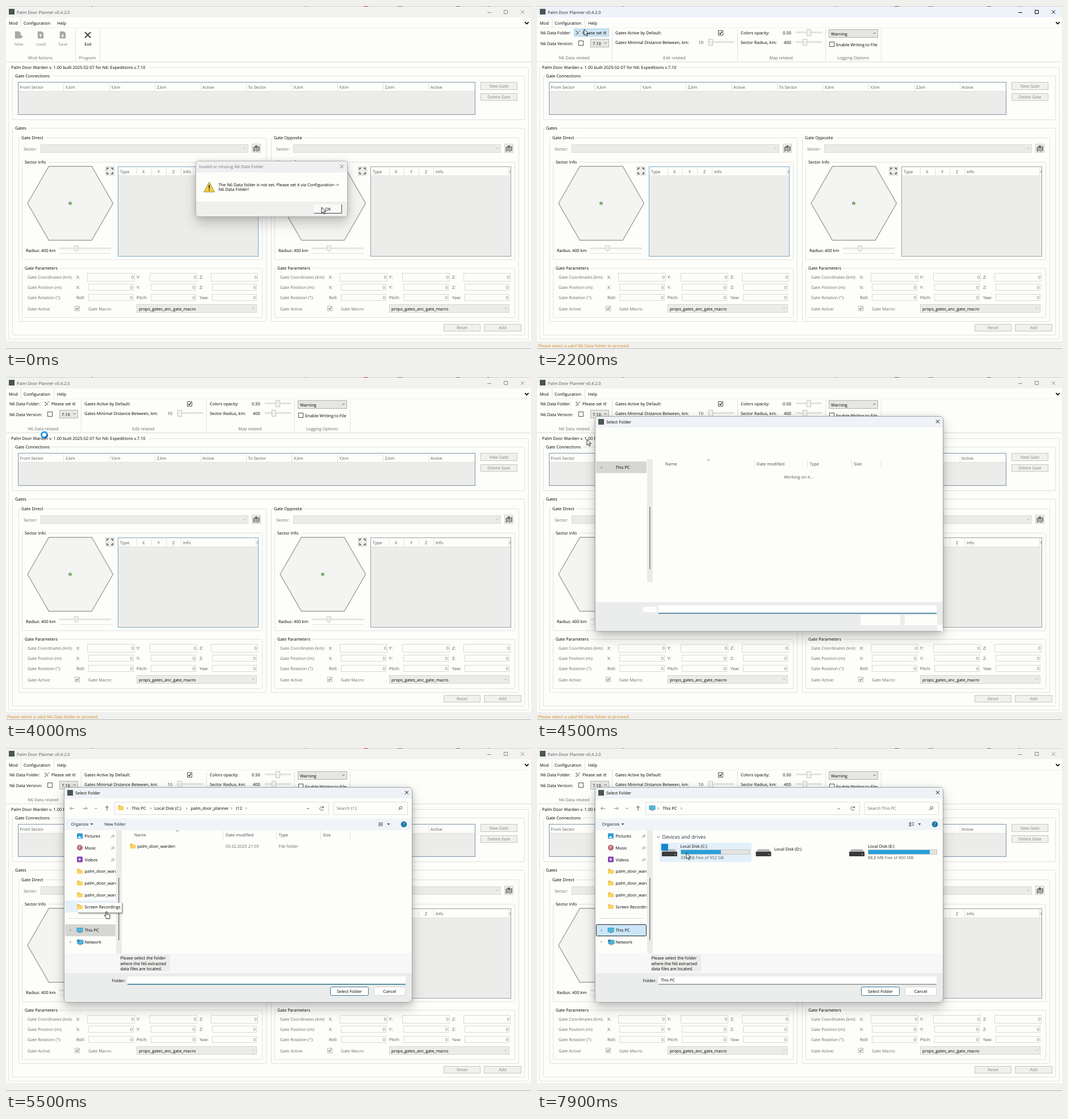
Recreate the animation shown at these times as an HTML page. Size 925 by 605 pixels, loop 8000 ms.

```html
<!DOCTYPE html>
<html lang="en">
<head>
<meta charset="utf-8">
<title>Gate planner</title>
<style>
html, body { margin: 0; width: 100%; height: 100%; overflow: hidden; background: #fdfdfa; }
svg { display: block; width: 925px; height: 605px; }
text { font-family: "Open Sans", "Noto Sans", sans-serif; font-size: 7.4px; text-rendering: geometricPrecision; white-space: pre; }
</style>
</head>
<body>
<svg id="stage" viewBox="0 0 925 605" xmlns="http://www.w3.org/2000/svg"></svg>
<script>
const INK = '#000', GREY = '#6c6c6c', PALE = '#fdfdfa', LINE = '#e0e0de', BLUE = '#26a0da';
const APP = 'Palm Door Planner', TOOL = 'Palm Door Warden', GAME = 'N6';

const text = (x, cy, s, fill = INK, anchor = 'start', more = '') =>
  `<text x="${x}" y="${cy + 2.6}" fill="${fill}" text-anchor="${anchor}" ${more}>${s}</text>`;
const mid = (x, cy, s, fill) => text(x, cy, s, fill, 'middle');
const fillBox = (x, y, x2, y2, fill, more = '') =>
  `<rect x="${x}" y="${y}" width="${x2 - x}" height="${y2 - y}" fill="${fill}" ${more}/>`;
const box = (x, y, x2, y2, fill, stroke, r = 0) =>
  `<rect x="${x + .5}" y="${y + .5}" width="${x2 - x - 1}" height="${y2 - y - 1}" rx="${r}" fill="${fill}" stroke="${stroke}"/>`;
const path = (d, stroke = INK, w = 1, fill = 'none') =>
  `<path d="${d}" fill="${fill}" stroke="${stroke}" stroke-width="${w}"/>`;
const dot = (x, y, r, fill) => `<circle cx="${x}" cy="${y}" r="${r}" fill="${fill}"/>`;
const vline = (x, y, y2, c = LINE) => path(`M${x + .5} ${y}V${y2}`, c);
const hline = (y, x, x2, c = LINE) => path(`M${x} ${y + .5}H${x2}`, c);
const down = (x, y, c = '#555', r = 2, w = .9) => path(`M${x - r} ${y - r / 2}l${r} ${r}l${r} ${-r}`, c, w);
const right = (x, y, c = '#555', r = 1.7) => path(`M${x - r / 2} ${y - r}l${r} ${r}l${-r} ${r}`, c, .9);
const cross = (x, y, r, c, w = 1) => path(`M${x - r} ${y - r}l${2 * r} ${2 * r}M${x + r} ${y - r}l${-2 * r} ${2 * r}`, c, w);
const layer = (id, s) => `<g id="${id}">${s}</g>`;
const shift = (dx, s) => `<g transform="translate(${dx} 0)">${s}</g>`;

// Controls
function group(x, y, x2, y2, label, chars) {
  return box(x, y, x2, y2, 'none', LINE, 1) +
    fillBox(x + 3, y - 2, x + 7 + chars, y + 3, PALE) + text(x + 5, y + .5, label);
}
const button = (x, y, x2, y2, s) => box(x, y, x2, y2, '#f0f0ee', '#c6c6c4') + mid((x + x2) / 2, (y + y2) / 2, s, '#888');
const combo = (x, y, x2, y2, c, stroke, arrow) => box(x, y, x2, y2, c, stroke) + down(x2 - 6.5, (y + y2) / 2 - .5, arrow);
function check(x, y, on, edge = '#555', mark = INK) {
  return box(x, y, x + 9, y + 9, '#fff', edge) + (on ? path(`M${x + 2.2} ${y + 4.5}l1.8 1.8l3 -4`, mark, 1.1) : '');
}
function slider(x, x2, y, thumb, c = '#c4c4c2') {
  return box(x, y - 2, x2, y + 1, '#ececea', '#dcdcda') + box(thumb, y - 6, thumb + 8, y + 6, '#f2f2f0', c);
}
function winButtons(c) {
  return path('M848 11.5h7', c) + path('M877.5 7.5h6v6h-6z', c) + cross(910, 10.5, 3, c);
}
const folder = (x, y) => fillBox(x - 5, y - 4, x, y, '#e0a62c', 'rx="1"') + fillBox(x - 5, y - 2.8, x + 5, y + 4.2, '#f8d262', 'rx="1"');
const monitor = (x, y) => fillBox(x - 5.5, y - 4.5, x + 5.5, y + 3, '#2f86ab', 'rx=".8"') +
  fillBox(x - 4.8, y - 3.8, x + 4.8, y + 2.3, '#4fb9dd') + fillBox(x - 2.5, y + 3.5, x + 2.5, y + 4.5, '#6b7b84');

// Application window
function sideOfGate(name, chars, focus) {
  let s = group(22, 232, 459, 557, name, chars) + text(31, 252, 'Sector:', GREY) +
    combo(61, 244, 427, 259, '#ebebe9', '#dadad8', '#aaa') +
    box(433, 243, 449, 259, '#eee', '#cfcfcd') +
    path('M436 249l3.5 -1.5l3.5 1.5l3.5 -1.5v7.5l-3.5 1.5l-3.5 -1.5l-3.5 1.5z', '#777', 1, '#999') +
    path('M439.5 248v7M443 249v7', '#ddd', .8) + dot(441, 248, 2.3, '#666') +
    group(28, 275, 452, 448, 'Sector Info', 40) +
    path('M38 348L75.5 282.7H151L188.5 348L151 413.3H75.5Z', '#a3a3a1', 1.5, '#f4f4f2') +
    dot(113, 348, 3.2, '#a5cd98') + path('M111.2 349.8v-2q1.8 -2.2 3.6 0v2', '#3d5c3b', .8) +
    box(175, 283, 191, 299, '#eeeeec', '#d2d2d0') +
    path('M178 289v-3h3M185 286h3v3M188 293v3h-3M181 296h-3v-3', '#555', 1.5) +
    box(197, 283, 445, 442, '#ececea', focus) + fillBox(198, 284, 444, 299, PALE) + hline(299, 198, 444);
  for (const x of [230, 256, 282, 308, 440]) s += vline(x, 285, 298);
  for (const [x, h] of [[201, 'Type'], [240, 'X'], [267, 'Y'], [293, 'Z'], [312, 'Info'], [442, 'I']]) s += text(x, 292, h, '#555');
  s += text(35, 431, 'Radius: 400 km') + box(94, 426, 185, 429, '#ececea', LINE) + hline(436, 94, 185) +
    path('M120.5 422.5h7v8l-3.5 3l-3.5 -3z', '#d0d0ce', 1, '#ededeb');
  s += group(28, 462, 452, 550, 'Gate Parameters', 59);
  const rows = [[478, 'Gate Coordinates (km):', 'X:', 'Y:', 'Z:'], [496, 'Gate Position (m):', 'X:', 'Y:', 'Z:'],
    [514, 'Gate Rotation (°):', 'Roll:', 'Pitch:', 'Yaw:']];
  rows.forEach(([y, name, ...axes], r) => {
    s += text(38, y + .5, name, GREY);
    axes.forEach((a, i) => {
      const x = [143, 253, 361][i] + (r ? 2 : 0), x2 = [227, 337, 444][i] - (r ? 2 : 0), h = r ? 6 : 7;
      s += text([124, 230, 341][i], y + .5, a, '#555') + box(x, y - h, x2, y + h + (r ? 0 : 1), PALE, '#d8d8d6') +
        text(x2 - 2, y, '0', GREY, 'end');
    });
  });
  return s + text(38, 534, 'Gate Active:', GREY) + check(121, 529, 1, '#b4b4b2', '#666') + text(145, 534, 'Gate Macro:', GREY) +
    combo(230, 526, 442, 541, '#ebebe9', '#d4d4d2', '#aaa') + text(234, 534, 'props_gates_anc_gate_macro');
}

function mainWindow() {
  let s = fillBox(0, 0, 925, 605, PALE) + fillBox(0, 0, 925, 20, '#f2f2f1') +
    layer('active', fillBox(0, 0, 925, 20, '#eef2f9') + winButtons(INK) + text(19, 11, APP + ' v0.4.2.0', '#222')) +
    layer('inactive', winButtons('#888') + text(19, 11, APP + ' v0.4.2.0', '#555')) +
    fillBox(0, 0, 925, 1, '#cfcfcd') + fillBox(5, 5, 15, 15, '#4a5650');
  for (const [x, w, c] of [[150, 2, '#555'], [526, 3, '#999'], [630, 8, '#b23b4a'], [690, 8, '#777'], [793, 7, '#666'], [848, 4, '#888']])
    s += fillBox(x, 0, x + w, 1, c);
  s += hline(38, 0, 925, '#efefed') + text(5, 30, 'Mod') + text(31, 30, 'Configuration') + text(90, 30, 'Help') +
    down(917.5, 30, INK, 3.2, 1.7) + hline(98, 0, 925, '#dcdcda');
  s += layer('modTab', modTab()) + layer('cfgTab', cfgTab());
  s += group(4, 108, 921, 588, `${TOOL} v. 1.00 built 2025-02-07 for ${GAME}: Expeditions v.7.10`, 241) +
    group(11, 123, 914, 201, 'Gate Connections', 63) +
    box(21, 134, 827, 192, '#ececea', '#8096a6') + fillBox(22, 135, 826, 151, PALE) + hline(150, 22, 826);
  const heads = ['From Sector', 'X,km', 'Y,km', 'Z,km', 'Active', 'To Sector', 'X,km', 'Y,km', 'Z,km', 'Active'];
  heads.forEach((h, i) => s += text(24.5 + i * 80.4, 143.5, h, '#5c5c5c') + (i ? vline(Math.round(21 + i * 80.4), 136, 150) : ''));
  s += button(836, 134, 901, 148, 'New Gate') + button(836, 154, 901, 167, 'Delete Gate') +
    group(11, 215, 914, 581, 'Gates', 22) +
    sideOfGate('Gate Direct', 41, '#79a8c4') + shift(445, sideOfGate('Gate Opposite', 52, '#9a9fa4')) +
    button(771, 561, 836, 574, 'Reset') + button(842, 561, 908, 574, 'Add') +
    fillBox(0, 591, 925, 605, '#f0f0ee') + hline(604, 0, 925, '#b5b5b3') +
    layer('status', text(2, 599.5, `Please select a valid ${GAME} Data folder to proceed.`, '#d88a1c'));
  return s;
}

function modTab() {
  const sheet = (x, mark) => path(`M${x - 5} 45h7l3 3v9h-10z`, '#a8a8a6', .5, '#a8a8a6') + path(mark, '#f6f6f4', 1.3);
  return path('M26.5 20V38', LINE) +
    sheet(21, 'M23 53h5M25.5 50.5v5') + dot(26, 54, 2.8, '#a8a8a6') +
    sheet(61, 'M61 55v-5M59 52l2 -2l2 2') + sheet(100, 'M100 49v5M98 52l2 2l2 -2') +
    cross(144, 51, 5, '#4a4a4a', 2.2) +
    ['New', 'Load', 'Save'].map((s, i) => mid(22.5 + i * 39, 67, s, '#888')).join('') + mid(144.5, 67, 'Exit') +
    mid(60.5, 91.5, 'Mod Actions', GREY) + mid(143.5, 91.5, 'Program', GREY) + vline(122, 40, 97) + vline(165, 40, 97);
}

function cfgTab() {
  let s = vline(26, 21, 38) + vline(84, 21, 38);
  for (const x of [132, 353, 508, 606]) s += vline(x, 41, 97);
  s += text(6, 47.5, GAME + ' Data Folder:') + layer('hover', box(65, 40, 127, 54, '#cde6f4', '#a4d0e8')) +
    path('M69.5 45l4.5 5M74 45l-4.5 5M68 44.5h2.5M68 50h2.5M74.5 44h2', '#444', .9) + text(80, 47.5, 'Please set it!') +
    text(6, 66, GAME + ' Data Version:') + check(73, 61, 0) + combo(94, 58, 127, 73, '#e6e6e4', '#b4b4b2', '#444') + text(98, 66, '7.10') +
    text(138, 47.5, 'Gates Active by Default:') + check(319, 43, 1) +
    text(138, 64.5, 'Gates Minimal Distance Between, km:') + text(284.5, 64, '10', '#173d2d') + slider(301, 347, 64, 302) +
    text(359, 47.5, 'Colors opacity:') + text(433, 47.5, '0.50') + slider(456, 502, 47, 475) +
    text(359, 64.5, 'Sector Radius, km:') + text(435, 64.5, '400') + slider(456, 502, 64, 468) +
    combo(514, 41, 601, 56, '#e6e6e4', '#b0b0ae', '#444') + text(518, 49, 'Warning') +
    check(515, 63, 0) + text(527, 68, 'Enable Writing to File');
  for (const [x, l] of [[65.5, GAME + ' Data related'], [242, 'Edit related'], [430, 'Map related'], [557, 'Logging Options']]) s += mid(x, 91.5, l, GREY);
  return s;
}

function messageBox() {
  return `<rect x="334.5" y="273.5" width="267" height="98" rx="5" fill="${PALE}" stroke="#b0b0ae" filter="url(#shade)"/>` +
    path('M335 293.5V279q0 -5 5 -5H596q5 0 5 5V293.5z', 'none', 0, '#eff0f1') +
    path('M335 345V366q0 5 5 5H596q5 0 5 -5V345z', 'none', 0, '#efefee') +
    text(340, 283.5, `Invalid or missing ${GAME} Data Folder`, '#777') + cross(591.5, 283, 3, '#777') +
    path('M358 310.5L367.5 328H348.5z', '#8d8d7a', 1, '#f7cf35') + path('M358 315.5v6.5M358 323.8v1.8', '#222', 1.7) +
    text(374.5, 315, `The ${GAME} Data folder is not set. Please set it via Configuration -&gt;`) +
    text(374.5, 323.5, GAME + ' Data Folder!') +
    fillBox(543, 350, 592, 366, '#fafaf8') + path('M543 365.5H591.5V350', '#444') + mid(567.5, 358, 'OK');
}

// Folder chooser
function chooser() {
  return `<rect x="102.5" y="69.5" width="613" height="379" rx="6" fill="${PALE}" stroke="#a6a6a4" filter="url(#shade)"/>` +
    path('M103 89V75q0 -5 5 -5H710q5 0 5 5V89z', 'none', 0, '#eff2f7') +
    path('M103 397V443q0 5 5 5H710q5 0 5 -5V397z', 'none', 0, '#ebecec') +
    fillBox(108, 74, 118, 84, '#4a5650') + text(122, 79.5, 'Select Folder') + cross(706, 78.5, 3, INK) +
    layer('columns', columns()) + layer('loading', loading()) + layer('loaded', loaded()) + fillBox(194, 145, 204, 362, '#ebebea') +
    fillBox(198, 229, 199.5, 339, '#7c7c7c') + layer('tip', tip());
}
function columns() {
  let s = path('M299.5 147.5l2.5 -2.5l2.5 2.5', '#666', .9);
  for (const [x, h] of [[226, 'Name'], [387, 'Date modified'], [480.5, 'Type'], [558.5, 'Size']]) s += text(x, 153.5, h, '#4a4a58');
  for (const x of [382, 476, 554, 606]) s += vline(x, 146, 161);
  return s;
}
const folderInput = c => fillBox(214, 403, 704, 417, '#fff') + fillBox(214, 416, 704, 417.4, c);
function loading() {
  return fillBox(104, 149, 193, 169.5, '#d6d6d4') + right(113.5, 159.5) + text(138.5, 159, 'This PC') +
    mid(461, 176, 'Working on it...', '#555') + folderInput('#1e6985') +
    fillBox(187, 405, 211, 415, PALE) + fillBox(570, 420, 640, 438, PALE) + fillBox(648, 420, 705, 438, PALE) + fillBox(705, 437, 715, 448, PALE);
}
function loaded() {
  let s = path('M120 106.5h-7.5M115.5 103.5l-3 3l3 3M135.5 106.5h7.5M140 103.5l3 3l-3 3', '#888', 1) + down(158.5, 106.5) +
    path('M178 110.5v-8M175 105.5l3 -3l3 3', '#444', 1) +
    box(191, 95, 569, 118, PALE, '#dededc') + down(532, 107) + path('M559 105a3.3 3.3 0 1 0 .3 3M559.5 102.5v3h-3', '#666', 1) +
    box(577, 95, 708, 118, PALE, '#dededc') + '<circle cx="695.5" cy="105.5" r="2.3" fill="none" stroke="#555"/>' + path('M693.8 107.2l-2.5 2.8', '#555') +
    fillBox(103, 124, 715, 145, '#f1f4f7') + text(114.5, 134.5, 'Organize', '#123') + path('M148.5 133h5l-2.5 3z', 'none', 0, '#444') +
    path('M671.5 133h5l-2.5 3z', 'none', 0, '#444') + dot(701, 134.5, 5.3, '#1976a8') + mid(701, 134.5, '?', '#fff') +
    layer('hoverRow', fillBox(104, 269, 193, 290, '#e4f0fa')) +
    layer('rowGrey', fillBox(104, 311, 193, 332, '#d6d6d4')) + layer('rowBlue', box(104, 311, 193, 332, '#cbe6f8', '#222', 1));
  const pin = y => path(`M185 ${y + 3}l2.2 -2.2M186 ${y - 1}l3 3M187 ${y - .5}l2 -2l2 2l-2 2`, '#888', 1);
  ['Pictures', 'Music', 'Videos'].forEach((n, i) => {
    const y = 155 + i * 20.8;
    s += [fillBox(125, 150.5, 135, 160, '#2f9bd8', 'rx="1"') + path('M126 159l3.5 -4l4 4z', 'none', 0, '#e5f4fc'),
      dot(130, y, 5, '#b8656b') + path(`M129 ${y + 2}v-4.5l3 1`, '#fff', 1),
      fillBox(125, y - 5, 135, y + 5, '#8746b5', 'rx="1.5"') + path(`M128.5 ${y - 2.5}l4 2.5l-4 2.5z`, 'none', 0, '#fff')][i];
    s += text(138.5, y + .3, n) + pin(y + .5);
  });
  for (let i = 0; i < 4; i++) {
    const y = 217.5 + i * 20.8;
    s += folder(130, y) + text(138.5, y + .2, i < 3 ? 'palm_door_warden' : 'Screen Recordings', INK, 'start', 'clip-path="url(#tree)"');
  }
  s += hline(300, 110, 188, '#d8d8d6') + right(113.5, 321.5) + monitor(130, 321.5) + text(138.5, 321.5, 'This PC') +
    right(113.5, 342) + monitor(131, 343) + dot(127.5, 340, 2.6, '#3c8fb5') + text(138.5, 342.3, 'Network') +
    fillBox(103, 362, 715, 397, '#f6f7f6') + fillBox(201, 364, 289, 394, '#ececeb');
  ['Please select the folder', `where the ${GAME} extracted`, 'data files are located.'].forEach((l, i) => s += text(201.5, 370.5 + i * 9.6, l));
  s += text(210.5, 410.5, 'Folder:', INK, 'end') + layer('t12', listHome()) + layer('pc', listPC()) +
    box(571, 421, 639, 437, '#fff', '#397a98', 2) + mid(605, 429.5, 'Select Folder') +
    box(648, 421, 704, 437, '#fff', '#d4d4d2', 2) + mid(676, 429.5, 'Cancel');
  for (const [x, y] of [[713, 442], [713, 445], [710, 445]]) s += fillBox(x, y, x + 1, y + 1, '#999');
  return s;
}
const crumbs = list => list.map(([x, s, gap]) => text(x, 106.5, s) + right(gap, 106.5)).join('') + right(213.5, 106.5);
function listHome() {
  return folder(202.5, 105.5) + crumbs([[221.5, 'This PC', 255], [261.5, 'Local Disk (C:)', 318], [325.5, 'palm_door_planner', 397.5], [405, 't12', 423]]) +
    text(582.5, 106.5, 'Search t12', GREY) + text(173.5, 134.5, 'New folder', '#123') +
    path('M656 132h8M656 134.5h8M656 137h8', '#444', 1) +
    folder(223.5, 173) + text(231.5, 173.5, 'palm_door_warden') + text(387, 173.5, '05.02.2025 21:59', '#666') + text(480.5, 173.5, 'File folder', '#666') +
    folderInput('#1e6985');
}
function listPC() {
  const drive = x => path(`M${x + 4} 178.5h19l4 5h-27z`, 'none', 0, '#b4b4b2') + fillBox(x, 183, x + 27, 191, '#3a3a3a', 'rx=".8"') +
    fillBox(x + 22, 187, x + 24.5, 188.3, '#7fd6c2');
  const gauge = (x, used, info) => box(x, 179, x + 122, 188, '#e4e4e2', '#c2c2c0') + fillBox(x + 1, 180, x + used, 187, BLUE) + text(x, 193.5, info, '#5c5c5c');
  return monitor(203, 106) + crumbs([[221.5, 'This PC', 254.5]]) + text(582.5, 106.5, 'Search This PC', GREY) +
    path('M656 131.5h3v2h-3zM656 135.5h3v2h-3zM661 131.5h3M661 134h3M661 136.5h3', '#444', .9) +
    down(214, 157, '#555', 2.6) + text(220.5, 157, 'Devices and drives', '#234', 'start', 'style="font-size:8.9px"') +
    layer('hoverC', fillBox(216, 167, 378, 201, '#e3f0fa')) +
    drive(220) + fillBox(219, 169, 231, 181, '#1787cd') + text(252.5, 173.5, 'Local Disk (C:)') + gauge(253, 71, '391 GB free of 952 GB') +
    drive(385.5) + text(418, 178, 'Local Disk (D:)') +
    drive(550) + text(583, 173.5, 'Local Disk (E:)') + gauge(583, 109, '88,8 MB free of 800 MB') +
    folderInput('#8a8a88') + text(218, 409.5, 'This PC');
}
function tip() {
  return `<g filter="url(#soft)">${fillBox(127, 273, 205, 291, PALE)}</g>` + path('M127 290.5H204.5V273', '#888', .8) +
    folder(130, 280) + text(138.5, 280, 'Screen Recordings');
}

function cursors() {
  return layer('arrow', path('M0 0V10.5L2.5 8.2L4.2 12L6 11.2L4.3 7.5H7.7z', '#111', .9, '#fff')) +
    layer('busy', '<circle r="5" fill="none" stroke="#2b9be0" stroke-width="3"/><circle id="arc" r="5" fill="none" stroke="#1268b0" stroke-width="3" stroke-dasharray="8 24"/>') +
    layer('hand', path('M-1 1q1.3 -1.3 2 0V5L5.5 6q1 .4 .8 2L5.5 11.5V13H-.5V11.5L-4 7.5q.4 -1.5 1.8 -.5L-1 8z', '#111', .9, '#fff'));
}

const stage = document.getElementById('stage');
stage.innerHTML = `<defs>
  <filter id="shade" x="-30%" y="-40%" width="160%" height="200%">
    <feDropShadow in="SourceGraphic" dx="0" dy="1" stdDeviation="5" flood-opacity=".14" result="near"/>
    <feDropShadow in="SourceGraphic" dx="0" dy="11" stdDeviation="11" flood-opacity=".2" result="far"/>
    <feMerge><feMergeNode in="far"/><feMergeNode in="near"/></feMerge>
  </filter>
  <filter id="soft" x="-20%" y="-30%" width="140%" height="180%"><feDropShadow dx="1" dy="1.5" stdDeviation="1.2" flood-opacity=".35"/></filter>
  <clipPath id="tree"><rect x="104" y="145" width="89.5" height="217"/></clipPath></defs>` +
  mainWindow() + layer('message', messageBox()) + layer('chooser', chooser()) + cursors();

// Visible spans in ms: [from, to, from, to, ...]
const LOOP = 8000, END = LOOP;
const spans = {
  active: [300, 3000], inactive: [0, 300, 3000, END], modTab: [0, 400], cfgTab: [400, END],
  message: [0, 300], status: [400, 5500], hover: [1900, 3100],
  chooser: [4400, END], loading: [4400, 4900], loaded: [4900, END], columns: [4400, 6500],
  t12: [4900, 6500], pc: [6500, END], hoverRow: [5200, 6100], tip: [5500, 6100],
  rowGrey: [4900, 6500], rowBlue: [6500, END], hoverC: [7300, END],
  arrow: [0, 3100, 4200, 5000, 6900, END], busy: [3100, 4200], hand: [5000, 6900]
};
// Pointer stops: time, x, y
const stops = [[0, 556, 355], [400, 556, 355], [1000, 432, 241], [1700, 104, 58], [2100, 83, 41], [3100, 83, 41],
  [4000, 67.5, 102], [4500, 88, 110], [5300, 177, 288], [5900, 177, 288], [6300, 154, 320], [6700, 154, 320], [7400, 256, 187], [7800, 263, 185], [END, 263, 185]];
const el = Object.fromEntries([...Object.keys(spans), 'arc'].map(id => [id, document.getElementById(id)]));

function pointer(t) {
  const i = stops.findIndex(s => s[0] > t), a = stops[i - 1], b = stops[i];
  const k = (t - a[0]) / (b[0] - a[0]), e = k * k * (3 - 2 * k);
  return [a[1] + (b[1] - a[1]) * e, a[2] + (b[2] - a[2]) * e];
}
function draw(now) {
  const t = Math.floor((now % LOOP) / 100) * 100;
  for (const id in spans) {
    const on = spans[id].some((from, i, s) => i % 2 === 0 && t >= from && t < s[i + 1]);
    el[id].setAttribute('display', on ? 'inline' : 'none');
  }
  const [x, y] = pointer(t);
  for (const id of ['arrow', 'busy', 'hand']) el[id].setAttribute('transform', `translate(${x} ${y})`);
  el.arc.setAttribute('transform', `rotate(${t * .36})`);
}
const start = performance.now();
function tick() {
  draw(Math.max(0, performance.now() - start));
  requestAnimationFrame(tick);
}
tick();
</script>
</body>
</html>
```
